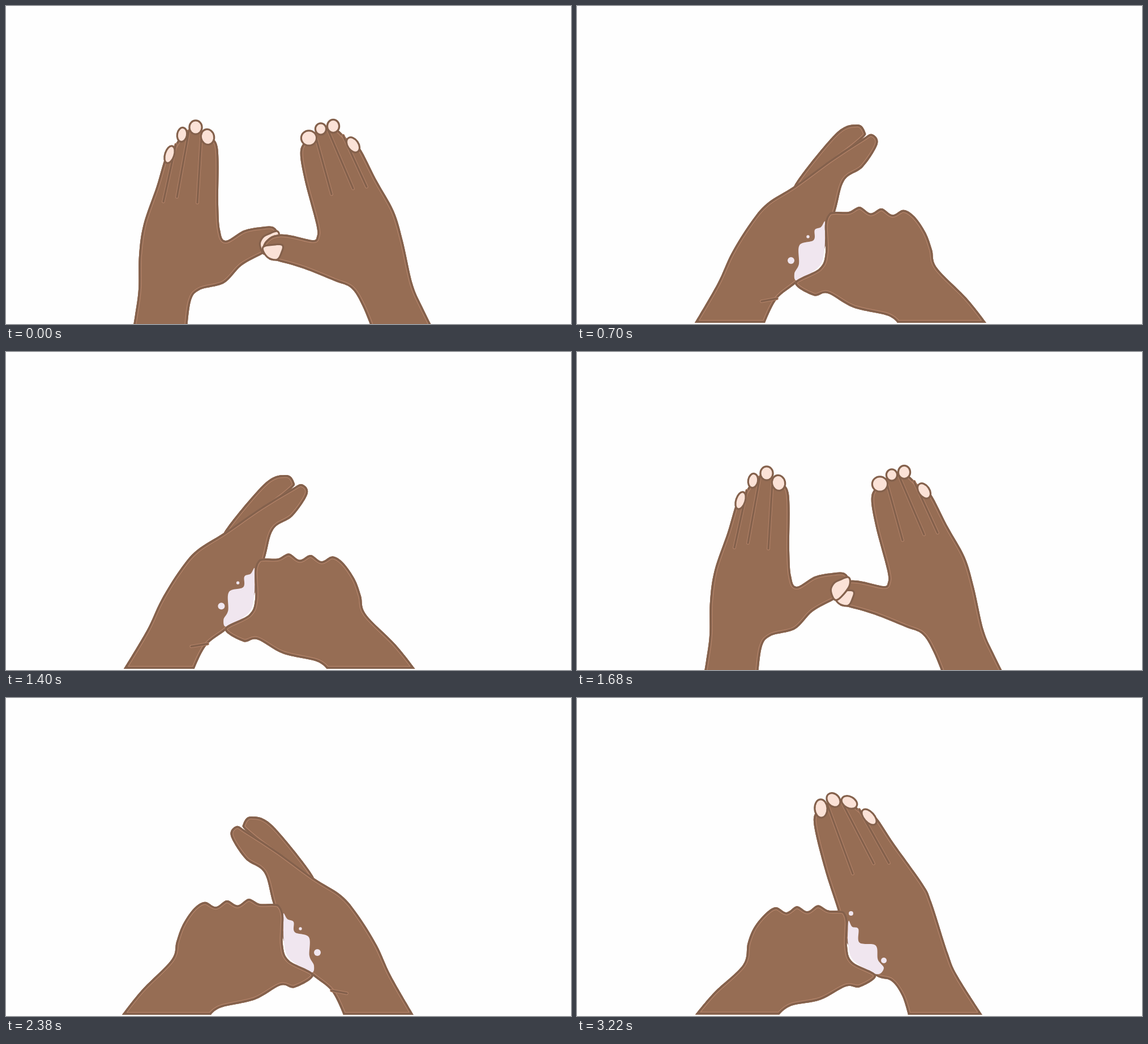
Write an HTML page with a canvas that moves like this. It is 998 px wide and 561 px high and loops after 3.36 s.

```html
<!DOCTYPE html>
<html lang="en">
<head>
<meta charset="utf-8">
<title>Hand washing</title>
<style>
  html, body { margin: 0; width: 100%; height: 100%; overflow: hidden; background: #fefefe; }
  canvas { display: block; width: 998px; height: 561px; }
</style>
</head>
<body>
<canvas id="stage" width="998" height="561"></canvas>
<script>
const ctx = document.getElementById('stage').getContext('2d');
const PAPER = '#fefefe', SKIN = '#966d54', EDGE = '#84614c', GLOW = '#b5846a', NAIL = '#fbe2d7', FOAM = '#f0e6ef';
const STEP = 140, MIRROR_SUM = 928, CUT = 555;

const points = text => text.trim().split(/\s+/).map(pair => pair.split(',').map(Number));
const mix = (a, b, t) => a.map((v, i) => Array.isArray(v) ? mix(v, b[i], t) : v + (b[i] - v) * t);

// Smooth curve through the points; points on the cut of the forearm are corners
function curve(list) {
  const count = list.length, path = new Path2D();
  const at = i => list[(i + count) % count];
  const slope = i => at(i)[1] > CUT ? [0, 0] : [0, 1].map(k => (at(i + 1)[k] - at(i - 1)[k]) / 6);
  path.moveTo(...at(0));
  for (let i = 0; i < count; i++) {
    const [a, b, from, to] = [at(i), at(i + 1), slope(i), slope(i + 1)];
    path.bezierCurveTo(a[0] + from[0], a[1] + from[1], b[0] - to[0], b[1] - to[1], ...b);
  }
  path.closePath();
  return path;
}

function oval(x, y, rx, ry = rx, degrees = 0) {
  const path = new Path2D();
  path.ellipse(x, y, rx, ry, degrees * Math.PI / 180, 0, 2 * Math.PI);
  return path;
}

function fill(path, color) {
  ctx.fillStyle = color;
  ctx.fill(path);
}

function stroke(path, color, width) {
  ctx.strokeStyle = color;
  ctx.lineWidth = width;
  ctx.stroke(path);
}

function skin(list) {
  const path = curve(list);
  fill(path, SKIN);
  ctx.save();
  ctx.clip(path);
  stroke(path, GLOW, 10);
  stroke(path, EDGE, 7.5);
  ctx.restore();
}

function crease(from, to) {
  const path = new Path2D();
  path.moveTo(...from);
  path.lineTo(...to);
  stroke(path, GLOW, 5.5);
  stroke(path, EDGE, 3.6);
}

function nail(path) {
  stroke(path, EDGE, 6.5);
  fill(path, NAIL);
}

// The outline runs from the little finger to the index through the nails, whose rims are the fingertips.
// A nail is x, y, two radii and a tilt; a crease starts between each two of them.
function flatHand({ outer, nails, inner, creaseEnds, thumbnail }, shape = list => list) {
  const tips = nails.map(([x, y]) => [x, y]);
  skin(shape([...outer, ...tips, ...inner]));
  creaseEnds.forEach((end, i) => crease(mix(tips[i], tips[i + 1], 0.5), end));
  nails.forEach(n => nail(oval(...n)));
  if (thumbnail) nail(curve(thumbnail));
}

const leftOpen = {
  outer: points('222,580 228,545 234,500 235,440 243,385 266,318 281,268'),
  nails: [[289, 262, 6.5, 14, 18], [311, 227, 7, 11, 10], [335, 214, 9.5, 10.5, 0], [356, 231, 10, 12, -12]],
  inner: points(`374,250 375,350 378,395 388,414 420,396 450,390 470,389 480,398 480,411 468,428 452,438
    416,458 385,489 342,501 326,522 319,580`),
  creaseEnds: points('278,345 302,337 338,347'),
  thumbnail: points('450,421 455,409 466,403 479,399 480,411 470,426 457,436')
};
const rightOpen = {
  outer: points('760,580 735,530 718,490 701,415 685,362 655,308 626,252'),
  nails: [[613, 245, 8, 13, -35], [578, 212, 9, 10, 0], [556, 217, 8, 8.5, 0], [535, 233, 12, 11.5, 0]],
  inner: points(`520,255 527,305 548,385 549,407 541,413 505,405 483,403 465,409 454,425 464,446 480,450
    525,463 580,485 610,498 630,530 650,580`),
  creaseEnds: points('637,319 613,322 575,332'),
  thumbnail: points('455,427 470,423 487,423 485,435 478,446 463,442')
};
const raised = {
  outer: points('716,559 672,490 655,450 626,360 610,327 560,257 529,211'),
  nails: [[516, 210, 7.5, 15, -42], [481, 184, 8.5, 13, -62], [453, 180, 9, 12, -42], [431, 195, 9.5, 14.5, -4]],
  inner: points('418,218 437,300 460,372 476,430 524,487 555,499 574,525 585,559'),
  creaseEnds: points('551,291 524,292 487,310')
};

// Two states of the washed hand, the fist and the foam; all others lie between them
const bent = {
  finger: points('419,222 433,209 472,226 545,320 470,270 424,234'),
  palm: points(`720,559 680,490 655,436 622,383 592,348 543,317 480,271 425,235 407,226 397,243 423,284
    456,308 472,363 500,450 540,488 575,517 596,559`),
  wrist: points('575,516 602,521'),
  thumb: points('483,366 472,363'),
  knuckles: points('448,363 332,371'),
  arm: points(`312,400 301,430 292,462 240,515 205,559 362,559 380,546 440,532 485,507 510,511 543,488
    500,463 489,435 490,385`),
  foam: points('490,380 497,390 508,395 510,413 535,422 536,455 544,472 538,484 500,459 491,430 490,400'),
  drops: [[520, 407, 2.7], [550, 449, 6]]
};
const folded = {
  finger: points('420,375 434,368 472,362 530,372 470,390 430,385'),
  palm: points(`719,559 660,500 637,475 605,420 572,385 520,344 460,349 400,364 368,373 363,383 400,395
    455,412 462,430 480,465 497,507 557,527 582,559`),
  wrist: points('513,490 577,490'),
  thumb: points('464,393 460,388'),
  knuckles: points('440,386 334,389'),
  arm: points(`313,410 302,435 294,480 245,523 213,558 353,558 377,540 420,533 465,511 490,509 513,490
    473,468 465,440 466,405`),
  foam: points('470,406 475,417 486,420 488,450 520,451 527,468 540,481 518,490 477,467 467,440 467,415'),
  drops: [[488, 411, 3.2], [502, 434, 7]]
};
const raisedDrops = [[484, 380, 4], [542, 463, 5]];

const between = t => Object.fromEntries(Object.keys(bent).map(key => [key, mix(bent[key], folded[key], t)]));

// Three bumps between the ends
const bumps = ([from, to]) => Array.from({ length: 7 }, (_, i) => {
  const [x, y] = mix(from, to, i / 6);
  return [x, y - 10 * (i % 2)];
});

// Leans a forearm outwards below the wrist; side is 1 for the right one, -1 for the left one
const leaning = (amount, side) => list => list.map(([x, y]) =>
  side * (x - MIRROR_SUM / 2) > 80 ? [x + side * amount * Math.max(0, y - 475), y] : [x, y]);

function fistAndFoam(state, drops, shape = list => list) {
  fill(curve(state.foam), FOAM);
  drops.forEach(d => fill(oval(...d), FOAM));
  skin(shape([...state.thumb, ...bumps(state.knuckles), ...state.arm]));
}

function drawOpen(rightOver) {
  const hands = [leftOpen, rightOpen];
  (rightOver ? hands : hands.reverse()).forEach(hand => flatHand(hand));
}

function drawRaised(handLean, fistLean) {
  flatHand(raised, leaning(handLean, 1));
  fistAndFoam(between(0.5), raisedDrops, leaning(fistLean, -1));
}

function drawFolding(amount) {
  const state = between(amount);
  skin(state.finger);
  skin(state.palm);
  fistAndFoam(state, state.drops);
  crease(...state.wrist);
}

// Steps of one half: open, three raised ones with the right forearm swinging in, folding and back, raised
const LEANS = [0.4, 0.5, 0];
const FOLDS = [0, 0, 0.68, 0.93, 1, 0.45, 0.05];
const HALF = 1 + LEANS.length + FOLDS.length + 1;

function draw(index) {
  const step = index % HALF, flip = index < HALF;
  const foldStep = step - 1 - LEANS.length;
  ctx.setTransform(1, 0, 0, 1, 0, 0);
  ctx.fillStyle = PAPER;
  ctx.fillRect(0, 0, 998, 561);
  ctx.lineCap = ctx.lineJoin = 'round';
  if (step === 0) {
    drawOpen(flip);
    return;
  }
  const amount = FOLDS[foldStep];
  if (flip) ctx.setTransform(-1, 0, 0, 1, MIRROR_SUM, amount === undefined ? 3 : 0);
  if (amount !== undefined) {
    drawFolding(amount);
  } else {
    const lean = LEANS[step - 1] || 0;
    drawRaised(flip ? 0 : lean, flip ? lean : 0);
  }
}

const start = performance.now();
let shown = -1;
function tick() {
  const index = Math.floor((performance.now() - start) / STEP) % (2 * HALF);
  if (index !== shown) draw(shown = index);
  requestAnimationFrame(tick);
}
tick();
</script>
</body>
</html>
```
